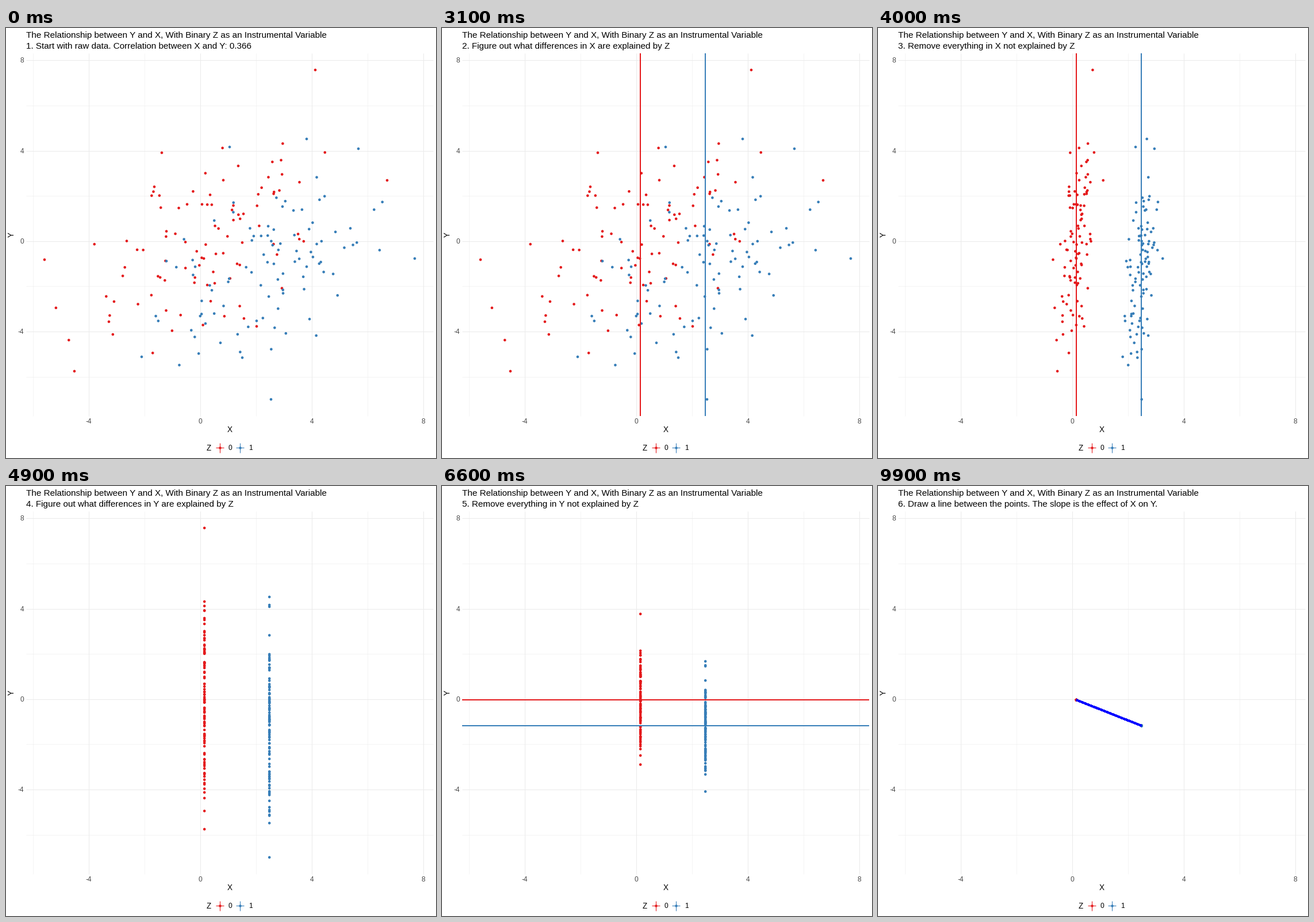
Animation, 748 px wide and 748 px high, one loop 10 s. Source, as a matplotlib script:

```python
import numpy as np
import matplotlib.pyplot as plt
from matplotlib.animation import FuncAnimation

SIZE, DPI = 748, 100
PX = 72 / DPI
RED, BLUE = "#E41A1C", "#377EB8"
COLORS = (RED, BLUE)
LEFT, RIGHT, TOP, BOTTOM = 35, 743, 44, 675
MEANS = np.array([(345.2, 372.2), (458.2, 417)])

# Frames each step holds, then frames of the move to the next step
HOLD = np.array([20, 11, 6, 11, 6])
MOVE = np.array([3, 8, 3, 8, 3])
END = np.cumsum(HOLD + MOVE)
START = END - MOVE

TITLE = "The Relationship between Y and X, With Binary Z as an Instrumental Variable"
STEPS = [
    "1. Start with raw data. Correlation between X and Y: 0.366",
    "2. Figure out what differences in X are explained by Z",
    "3. Remove everything in X not explained by Z",
    "4. Figure out what differences in Y are explained by Z",
    "5. Remove everything in Y not explained by Z",
    "6. Draw a line between the points. The slope is the effect of X on Y.",
]

plt.rcParams["font.family"] = "Liberation Sans"
rng = np.random.default_rng(12)


def cloud(mean, spread, corr, extremes):
    """100 correlated normal points with a fixed mean and fixed extremes."""
    n = 100 - len(extremes)
    r = np.sqrt(-2 * np.log(1 - np.linspace(0, 0.88, n)))
    angle = rng.uniform(0, 2 * np.pi, n)
    u, v = r * np.cos(angle), r * np.sin(angle)
    core = np.column_stack([u, corr * u + np.sqrt(1 - corr**2) * v]) * spread
    core += (100 * mean - np.sum(extremes, axis=0)) / n - core.mean(0)
    return np.vstack([extremes, core])


data = np.vstack([
    cloud(MEANS[0], (120, 105), -0.57,
          [(67, 403), (119, 597), (271, 217), (436, 519), (538, 73), (663, 265)]),
    cloud(MEANS[1], (103, 97), -0.45,
          [(236, 572), (389, 207), (461, 646), (523, 193), (613, 210), (711, 401)]),
])
centres = np.repeat(MEANS, 100, axis=0)

fig = plt.figure(figsize=(SIZE / DPI, SIZE / DPI), dpi=DPI, facecolor="white")
ax = fig.add_axes([0, 0, 1, 1])
ax.set_xlim(0, SIZE)
ax.set_ylim(SIZE, 0)
ax.axis("off")


def line(x, y, color, width, z=1, **kw):
    return ax.plot(x, y, color=color, lw=width * PX, zorder=z,
                   solid_capstyle="butt", **kw)[0]


def label(x, y, text, size, color="black", ha="center", va="center_baseline", **kw):
    return ax.text(x, y, text, fontsize=size * PX, color=color, ha=ha, va=va, **kw)


def px(x):
    return 338 + 48.5 * x


def py(y):
    return 370.8 - 39.3 * y


# Grid and tick labels
for v in range(-6, 9, 2):
    major = v % 4 == 0
    style = ("#EBEBEB", 1.07) if major else ("#EBEBEB", 0.53)
    line([px(v)] * 2, [TOP, BOTTOM], *style)
    line([LEFT, RIGHT], [py(v)] * 2, *style)
    if major:
        label(px(v), 683.5, str(v), 12, "#4D4D4D")
        label(31, py(v) - 0.5, str(v), 12, "#4D4D4D", ha="right")

label(389, 697.5, "X", 13.5)
label(10, 359.5, "Y", 13.5, rotation=90, va="center")
label(LEFT, 17, TITLE, 15.2, ha="left", va="baseline")
step_text = label(LEFT, 35.5, "", 15.2, ha="left", va="baseline")

# Legend
label(353, 729.5, "Z", 13.5)
for x, color, name in ((372, RED, "0"), (407.5, BLUE, "1")):
    line([x, x], [721.5, 738.5], color, 1.07)
    line([x - 7, x + 7], [730, 730], color, 1.07)
    ax.scatter([x], [730], s=(4.4 * PX) ** 2, c=color, linewidths=0, zorder=2)
    label(x + 18, 729.5, name, 12)

dots = ax.scatter(*data.T, s=(4.6 * PX) ** 2, c=np.repeat(COLORS, 100),
                  linewidths=0, zorder=3)
v_lines = [line([m[0]] * 2, [TOP, BOTTOM], c, 2, 4) for m, c in zip(MEANS, COLORS)]
h_lines = [line([LEFT, RIGHT], [m[1]] * 2, c, 2, 4) for m, c in zip(MEANS, COLORS)]
slope = line(*MEANS.T, "blue", 3, 5, antialiased=False)


def ease(i, k):
    p = np.clip((i - START[k]) / MOVE[k], 0, 1)
    return (1 - np.cos(np.pi * p)) / 2


def update(i):
    step_text.set_text(STEPS[np.sum(i >= START + MOVE // 2)])
    amount = np.array([ease(i, 1), ease(i, 3)])
    dots.set_offsets(data + (centres - data) * amount)
    for item in v_lines:
        item.set_visible(END[0] <= i <= START[2])
    for item in h_lines:
        item.set_visible(END[2] <= i <= START[4])
    slope.set_visible(i >= END[4])
    return [dots, step_text, slope, *v_lines, *h_lines]


anim = FuncAnimation(fig, update, frames=100, interval=100, repeat=True,
                     repeat_delay=0, blit=False)
plt.show()
```
